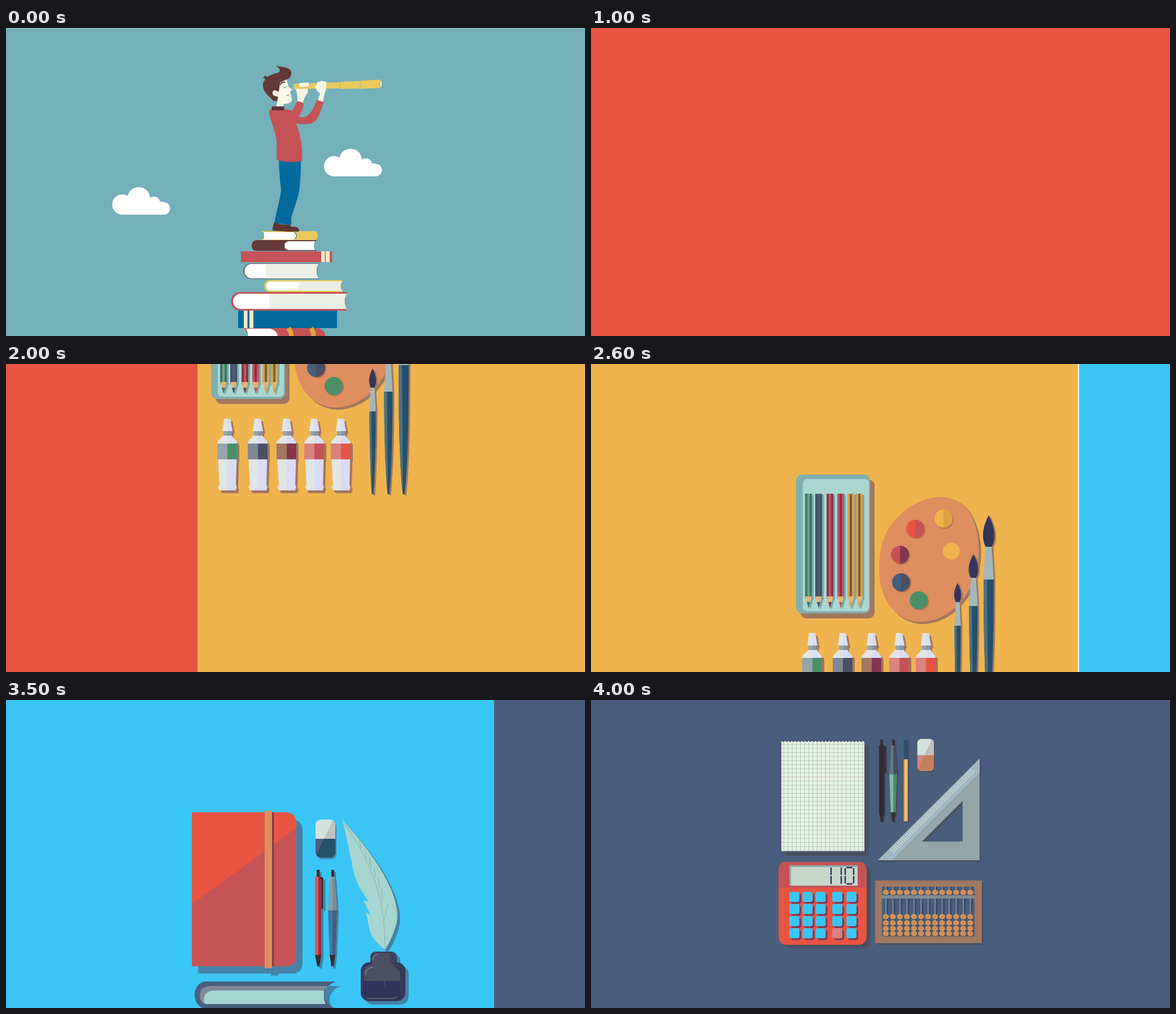
Write an HTML page that moves like this. It is 1025 px wide and 546 px high and loops after 4.1 s.

```html
<!DOCTYPE html>
<html lang="en">
<head>
<meta charset="utf-8">
<title>Learning scenes</title>
<style>
  html, body { margin: 0; width: 100%; height: 100%; overflow: hidden; }
  svg { display: block; width: 1025px; height: 546px; }
</style>
</head>
<body>
<svg id="stage" viewBox="0 0 1025 546"></svg>
<script>
const RED = '#e75442', ROSE = '#c55356', WINE = '#85354f', NAVY = '#495e7d', SLATE = '#4a5063',
  GOLD = '#efb44e', SKY = '#3ac6f4', MINT = '#a5d5cf', GREEN = '#4a8f68', INK = '#30345a',
  STEEL = '#94a5aa', DEEP = '#24506a', TAN = '#a1775f', CREAM = '#faf5e4', BARK = '#633838', PINK = '#d9827e';

// Drawing helpers, all returning SVG markup
const rect = (x, y, w, h, fill, rx = 0) => `<rect x="${x}" y="${y}" width="${w}" height="${h}" rx="${rx}" fill="${fill}"/>`;
const path = (d, fill) => `<path d="${d}" fill="${fill}"/>`;
const line = (d, stroke, w = 1, extra = '') => `<path d="${d}" fill="none" stroke="${stroke}" stroke-width="${w}" ${extra}/>`;
const oval = (x, y, rx, ry, fill) => `<ellipse cx="${x}" cy="${y}" rx="${rx}" ry="${ry}" fill="${fill}"/>`;
const dot = (x, y, r, fill) => oval(x, y, r, r, fill);
const at = (x, y, art, scale = 1) => `<g transform="translate(${x} ${y}) scale(${scale})">${art}</g>`;
const shade = (dx, dy, color, art) => `<g style="filter:drop-shadow(${dx}px ${dy}px 0 ${color})">${art}</g>`;
const times = (n, fn) => Array.from({ length: n }, (_, i) => fn(i)).join('');

// Book lying flat, white pages shaded from x = split
function pageBook(x, y, w, h, cover, split, t = 3) {
  const block = (l, top, right, height, fill) =>
    path(`M${right} ${top}H${l + height / 2}a${height / 2} ${height / 2} 0 0 0 0 ${height}H${right}q-7 ${-height / 2} 0 ${-height}`, fill);
  const r = x + w, ph = h - 2 * t;
  return block(x, y, r, h, cover) + block(x + t + 1, y + t, r - 1, ph, '#fff') +
    path(`M${split} ${y + t}H${r - 1}q-7 ${ph / 2} 0 ${ph}H${split}z`, '#ebefe5');
}

// Thick hardback with a forked fore edge
function tome(x, y, right, h, cover, page) {
  return path(`M${right} ${y}H${x + 20}a20 ${h / 2} 0 0 0 0 ${h}H${right}q-20 -8 -20 ${-h / 2}t20 ${-h / 2}`, cover) +
    path(`M${right - 12} ${y + 8}H${x + 27}q-18 1 -18 16q0 14 10 16H${right - 21}V${y + 16}z`, '#808996') +
    path(`M${right - 21} ${y + 16}H${x + 32}q-16 2 -16 18q0 4 4 ${h - 42}H${right - 18}q-3 -6 -3 -10z`, page);
}

const clickPen = (left, right, dark) =>
  rect(-2, 0, 5, 13, dark) + rect(-5, 12, 6, 140, left) + rect(1, 12, 5, 140, right) +
  path('M-5 151H6L3 171H-1z', dark) + line('M4 15H8V69', dark, 3);
const gripPen = (top, topDark, low, lowDark, dark) =>
  rect(-2, 0, 5, 13, dark) + path('M-4 12H2V72H-8z', top) + path('M0 12H4L8 72H0z', topDark) +
  path('M-8 72H1V152H-5z', low) + path('M0 72H8L5 152H0z', lowDark) + path('M-5 151H5L2 171H-2z', dark);
const eraser = (low, lowDark) => `<g clip-path="url(#soft)">` +
  rect(0, 0, 35, 34, '#d3e3dc') + rect(0, 34, 35, 33, low) +
  path('M31 0H35V34H15z', '#c2bfc0') + path('M15 34H35V67H0z', lowDark) + '</g>';

function manScene() {
  const books =
    path('M453 360H545Q552 360 552 368T545 376H453V374H514V362H453z', '#e9c95b') + path('M456 362H511Q516 368 511 375H456q2 -6 0 -13', '#fff') +
    line('M510 362Q519 368 510 375', '#55505e') +
    path('M549 376H444Q435 377 435 386T444 395H549V393.500H500V378H549z', BARK) +
    path('M547 378H500Q493 379 493 386T500 393.500H547q-4 -8 0 -15.500', '#fff') +
    rect(416, 396, 161.500, 19, ROSE) + rect(558, 396, 6.500, 19, '#f5ecc6') + rect(566, 396, 7, 19, '#f5ecc6') +
    pageBook(420, 417, 134, 28, '#6a6572', 460, 1.2) +
    pageBook(457, 447, 139, 21, '#e9c95b', 518, 2.4) +
    pageBook(398, 468, 206, 33, ROSE, 466, 3) +
    rect(411, 501, 175, 31, '#016a9d') + rect(421, 501, 6.500, 31, '#f5ecc6') + rect(431, 501, 7, 31, '#f5ecc6') +
    path('M421 532H552Q566 535 566 550H428Q428 538 421 532', ROSE) + path('M425 533H468Q482 537 481 550H428Q429 540 425 533', '#fff') +
    line('M500 532q6 8 5 18M540 532q6 8 4 18', '#dfa83c', 8);
  const body =
    path('M483 233H522C522 260 521 283 517 298L505 336V349L475 346C479 325 486 300 487 287C485 270 483 250 483 233z', '#016a9d') +
    path('M475 344Q487 350 501 348L505 352Q518 352 519 358L518 361H500L472 359Q471 355 475 344', '#5f3635') +
    path('M478 67C488 69 504 70 505 78C506 87 500 91 496 92L486 96L483 112L480 129L475 130C462 119 453 110 455 97L459 91L455 88L459 84L462 87C468 82 478 81 484 78Q487 73 478 67', BARK) +
    path('M485 97L497 91L500 104L508 110L503 112L506 125Q507 133 498 134L491 135L492 141H478L481 128L482 122L474 120Q469 113 475 110L483 113z', CREAM) +
    line('M485 101Q489 94 494 97', BARK, 2) + line('M491 105Q495 107 497 104M496 119Q499 121 502 118', '#4f7f86', 1) +
    path('M470 143Q465 145 466 152C470 168 478 188 479 200V234Q500 240 524 236C526 210 520 185 514 170L508 147L497 144z', ROSE) +
    rect(470.500, 139, 22, 7, '#5b3237') +
    path('M512 107Q518 119 515 132L525 134Q528 122 534 115L535 104z', CREAM) +
    path('M502 148L507 147L515 130Q522 130 527 134C525 148 519 157 513 162z', ROSE) +
    path('M510 152Q520 161 531 157C540 152 546 140 550 128Q557 125 562 131C558 147 552 162 545 167Q535 173 512 169z', ROSE);
  const scope =
    path('M509 99L591 96V107L509 108z', '#e9c95b') + path('M591 95.500L627 94V107.500L591 108z', '#e9c95b') +
    oval(661.500, 99, 3.500, 7, '#fff') + path('M627 93.500L662 91.500V106L627 108z', '#e9c95b') +
    line('M509.500 98.500V109M591 95V108.500M627 93V108.500M662 91V107', '#cbb98b', 2);
  const fingers = times(4, i => oval(521.500 + 4 * i, 101 - i / 4, 2.600, 4, CREAM)) +
    path('M546 101Q550 113 556 116L552 128L561 131L564 116Q568 109 567 97Q565 92 562 95Q558 92 555 96Q550 93 550 104z', CREAM);
  return books + body + scope + fingers;
}

function labScene() {
  const shadow = '#a8433f';
  const globe = line('M395 72A93 93 0 1 0 461 231', GOLD, 7) + rect(391, 255, 8, 34, TAN) + rect(346, 284, 98, 14, TAN, 6) +
    dot(395, 165, 82, SKY) + path('M340 110q30 -22 54 -20l8 26l-24 18l4 24l-30 4l-26 -24z', GREEN) +
    path('M400 160l44 -8l22 28l-30 52l-24 4z', GREEN);
  const tubes = times(3, i => rect(554 + 46 * i, 75, 26, 140, '#dfe6e6', 13) +
    path(`M${554 + 46 * i} 130h26v72a13 13 0 0 1 -26 0z`, [GREEN, GOLD, NAVY][i]) + rect(550 + 46 * i, 72, 34, 9, STEEL, 3)) +
    rect(536, 158, 148, 16, TAN);
  const flask = path('M603 258h34v58l48 102q6 15 -10 15h-110q-16 0 -10 -15l48 -102z', '#dfe6e6') +
    path('M582 362h76l27 56q6 15 -10 15h-110q-16 0 -10 -15z', MINT) + rect(597, 254, 46, 9, STEEL, 3);
  return shade(8, 8, shadow, globe) + shade(5, 5, shadow, tubes) + shade(7, 7, shadow, flask) +
    shade(8, 8, shadow, tome(302, 335, 500, 48, NAVY, MINT) + tome(302, 384, 530, 49, GOLD, '#c6d8cb'));
}

function artScene() {
  const shadow = '#a1775f';
  const pencil = (x, a, b) => shade(3, 2, '#74a9ab',
    rect(x, -150, 4, 186, a) + rect(x + 4, -150, 4, 186, b) + rect(x + 8, -150, 4, 186, a) +
    path(`M${x} 32L${x + 6} 53L${x + 12} 32L${x + 9} 41H${x + 3}z`, '#e3b477') + path(`M${x} 32H${x + 12}L${x + 9} 42H${x + 3}z`, '#e3b477') +
    path(`M${x + 3} 42H${x + 9}L${x + 6} 53z`, a));
  const pencils = [['#3f7567', '#6fa08a'], [SLATE, NAVY], [WINE, ROSE], [ROSE, WINE], ['#d9a344', '#7d5b47'], ['#d9a344', '#7d5b47']];
  const box = rect(363, -184, 131, 246, '#80b0b0', 11) + rect(375, -176, 117, 234, '#a9d8d2', 7) +
    pencils.map(([a, b], i) => pencil([379, 397, 417, 436, 454, 469][i], a, b)).join('');
  const paint = (x, y, a, b) => shade(2, 2, '#b8734f', dot(x, y, 16, a) + path(`M${x} ${y - 16}a16 16 0 0 1 0 32z`, b));
  const palette = path('M511 0C516 45 545 77 583 77C625 77 658 45 674 12C690 -20 696 -90 660 -130C610 -170 530 -120 515 -60Q508 -30 511 0', '#de8d5e') +
    dot(638, -48, 15, GOLD);
  const paints = paint(549, 7, '#465f80', SLATE) + paint(580, 39, GREEN, GREEN) + paint(547, -42, ROSE, WINE) +
    paint(574, -88, RED, ROSE) + paint(624, -106, GOLD, '#d9a344');
  const tube = (x, tint, color) => at(x, 0, shade(4, 5, shadow,
    path('M-6 97H0V119H-9z M-7 126H0V141H-18V138z M-18 141H0V216H-14z M-17 216H0V224H-14z', '#dfe6e6') +
    path('M0 97H5L9 119H0z M0 126H7L17 138V141H0z M0 141H17L15 216H0z M0 216H17L15 224H0z', '#d9dcf4') +
    rect(-7, 119, 7, 8, STEEL) + rect(0, 119, 7, 8, '#8696a5') +
    rect(-18, 141, 18, 28, tint) + rect(0, 141, 17, 28, color)));
  const brush = (x, w, y, metal, hair) => shade(3, 2, shadow,
    path(`M${x - w} ${y}H${x + w}Q${x + w} 170 ${x + 1.500} 231H${x - 1.500}Q${x - w} 170 ${x - w} ${y}`, DEEP) +
    path(`M${x - w} ${y}H${x - w / 3}L${x - 1} 228Q${x - w} 170 ${x - w} ${y}`, '#4f7183') +
    path(`M${x - w} ${y}L${x - w * .6} ${y - metal}H${x + w * .6}L${x + w} ${y}z`, '#a3b7bd') +
    path(`M${x - w * .6} ${y - metal}Q${x - w * 1.900} ${y - metal - hair * .4} ${x} ${y - metal - hair}Q${x + w * 1.900} ${y - metal - hair * .4} ${x + w * .6} ${y - metal}z`, '#34355a'));
  return shade(8, 9, shadow, box) + shade(4, 4, shadow, palette) + paints +
    tube(392, STEEL, GREEN) + tube(446, '#7f8896', SLATE) + tube(497, TAN, WINE) + tube(546, PINK, ROSE) + tube(593, PINK, RED) +
    brush(649, 5.500, 84, 42, 34) + brush(677, 7.500, 49, 50, 42) + brush(704, 9, 2, 58, 56);
}

function writeScene() {
  const shadow = '#4483a5';
  const notebook = path('M329 199H494Q514 199 514 219V452Q514 472 494 472H329z', RED) +
    path('M329 362L514 227V452Q514 472 494 472H329z', ROSE) + rect(458, 196, 13, 279.500, '#de8d5e') + rect(471, 199, 3, 273, WINE);
  const feather = path('M596 213C640 260 700 340 692 392Q688 415 671 443Q646 422 644 408L637 376L646 382L633 356L642 357C625 333 618 320 614 297z', MINT) +
    line('M598 217C640 280 672 340 671 443M629 265L625 249M638 282L635 264M647 299L643 280M654 316L652 297M661 335L659 314M666 358L665 334M670 388L676 362', '#8fabab', 1);
  const well = rect(645, 446, 47, 32, '#3c4262', 9) + rect(628, 465, 79, 69, '#34395a', 15) +
    path('M649 458Q650 449 658 449H678L682 466L697 482V498H633V484Q633 472 648 469z', SLATE) +
    path('M633 498H697V524Q690 530 640 528Q633 526 633 520z', INK) +
    line('M636 488Q637 474 650 474M649 462Q650 451 658 451', '#6b7288', 2) + line('M640 529H686L692 525', '#565c78', 2) + line('M670 498V507', '#565c78', 1);
  return shade(11, 13, shadow, notebook) + shade(2, 3, shadow, at(548, 212, eraser(NAVY, DEEP))) +
    shade(4, 4, shadow, at(552, 301, clickPen(RED, WINE, '#332d31'))) +
    shade(3, 4, shadow, at(578, 301, gripPen('#7fa5a6', '#808996', '#3f7ba6', NAVY, '#332d31'))) +
    shade(5, 5, shadow, feather) + shade(6, 6, shadow, well) +
    shade(11, 8, shadow, tome(335, 549, 702, 49, RED, '#c6d8cb')) + shade(9, 8, shadow, tome(334, 499, 584, 48, NAVY, MINT));
}

function mathScene() {
  const shadow = SLATE;
  const pad = rect(337, 73, 147, 195, '#e9f5e6') +
    times(20, i => line(`M${341.500 + 7.350 * i} 75V268`, '#a9c5bd', 1)) +
    times(27, i => line(`M337 ${78.500 + 7.250 * i}H484`, i == 8 ? '#cfc3b8' : '#b3c8be', 1)) +
    line('M339 73H484', '#4a5063', 2.500, 'stroke-dasharray="3 3"');
  const pencil = rect(553.500, 71, 7.500, 34, DEEP) + rect(553.500, 105, 7.500, 110, '#dca24e') + rect(556, 105, 2.500, 110, '#f3d08a');
  const square = `<path d="M688 104V284H508zM658 179L586 251H658z" fill="${STEEL}" fill-rule="evenodd"/>` +
    path('M688 104L508 284H533L688 129z', '#a0b8c4') + line('M533 268L676 125', '#c9dcd5', 10, 'stroke-dasharray="1.600 2.400"');
  const xs = [351, 374.500, 397.500, 427, 452];
  const keys = times(20, i => rect(xs[i % 5], 340 + 21.500 * (i / 5 | 0), 18, 18, i == 18 ? PINK : SKY, 4));
  const calculator = rect(332, 287, 156, 147, RED, 14) + path('M332 333V301Q332 287 346 287H474Q488 287 488 301V333z', ROSE) +
    rect(351, 293, 121, 36, STEEL) + rect(354, 296, 118, 33, '#c6d8cb') +
    line('M425 297V310M425 312V326M443 297V310M443 312V326M450 298V310M450 312V325M465 298V310M465 312V325M452 297H463M452 326H463', INK, 2.500);
  const rodX = i => 522 + 12.450 * i;
  const abacus = rect(503, 320, 189, 111, TAN) + rect(515, 331, 164, 88, NAVY) +
    times(13, i => rect(rodX(i) + 2, 331, 2, 88, '#3c4560') + rect(rodX(i) - 1, 331, 2, 88, '#7f8896')) + rect(515, 346, 164, 6, '#808996') +
    [341, 384, 395, 405, 414].map(y => times(13, i => oval(rodX(i) + 1, y + 1, 5.500, 4.500, '#5b4f58') +
      oval(rodX(i), y, 5.200, 4.500, '#d69458') + line(`M${rodX(i) - 2} ${y + 2}l5 -4`, '#b8793f', 1))).join('');
  return shade(7, 8, shadow, pad) +
    shade(2, 2, '#3f4a63', at(514, 70, clickPen('#332d31', '#332d31', '#332d31'), .854)) +
    shade(2, 2, '#3f4a63', at(535, 70, gripPen('#5f7b86', SLATE, '#7fb9ab', GREEN, '#332d31'), .854)) +
    shade(3, 2, shadow, pencil) + shade(2, 2, shadow, at(577.500, 69, eraser(PINK, '#c5805c'), .85)) +
    shade(3, 3, shadow, square) + shade(7, 6, shadow, calculator) + shade(3, 3, '#85354f', keys) + shade(3, 3, shadow, abacus);
}

const cloud = (x, y) => at(x, y, dot(18, 31, 18, '#fff') + dot(47, 20, 20, '#fff') + dot(74, 28, 11, '#fff') +
  dot(91.500, 38, 11, '#fff') + rect(18, 26, 73, 23, '#fff'));

// Steps last 100 ms; a panel takes six of them to cross the stage
const STEP = 100, STEPS = 41, SPAN = 6, EXIT = 127;
const scenes = [
  { color: RED, start: 4, settle: 13, speed: 150, base: 0, shift: 0, art: labScene },
  { color: GOLD, start: 16, settle: 22, speed: 126.500, base: 253, shift: 0, art: artScene },
  { color: SKY, start: 25, settle: 31, speed: 126.500, base: -127, shift: -3, art: writeScene },
  { color: NAVY, start: 34, settle: 40, speed: 126.500, base: 0, shift: 0, art: mathScene },
];

const stage = document.getElementById('stage');
stage.innerHTML = '<clipPath id="soft"><rect width="35" height="67" rx="9"/></clipPath>' +
  rect(0, 0, 1025, 546, '#74b0ba') + rect(0, 0, 1025, 1, '#a3cbd1') +
  scenes.map((s, i) => `<g id="panel${i}">${s.color == SKY ? rect(-2, 0, 2, 546, '#fff') : ''}${rect(0, 0, 1100, 546, s.color)}</g>`).join('') +
  `<g id="clouds">${cloud(188, 282)}${cloud(563, 214)}</g><g id="man">${manScene()}</g>` +
  scenes.map((s, i) => `<g id="items${i}">${s.art()}</g>`).join('');

const move = (id, x, y) => document.getElementById(id).setAttribute('transform', `translate(${x} ${y})`);
const clamp = (v, lo, hi) => Math.min(hi, Math.max(lo, v));
const reach = k => k <= 2 ? 161 * k : 322 + 182 * (k - 2);

function draw(now) {
  const step = Math.floor(now / STEP) % STEPS;
  const fall = Math.max(0, step - scenes[0].start);
  move('man', 0, 80 * fall);
  move('clouds', 41 * Math.min(step, 4), 67 * fall);
  scenes.forEach((s, i) => {
    const k = clamp(step - s.start, 0, SPAN);
    move('panel' + i, k ? Math.max(0, 1025 - reach(k) + (k > 2 ? s.shift : 0)) : 1100, 0);
    const next = scenes[i + 1];
    const leave = next ? EXIT * Math.max(0, step - next.start) : 0;
    move('items' + i, 0, s.base + s.speed * Math.min(0, step - s.settle) + leave);
  });
}

const begin = performance.now();
function tick() {
  draw(performance.now() - begin);
  requestAnimationFrame(tick);
}
tick();
</script>
</body>
</html>
```
